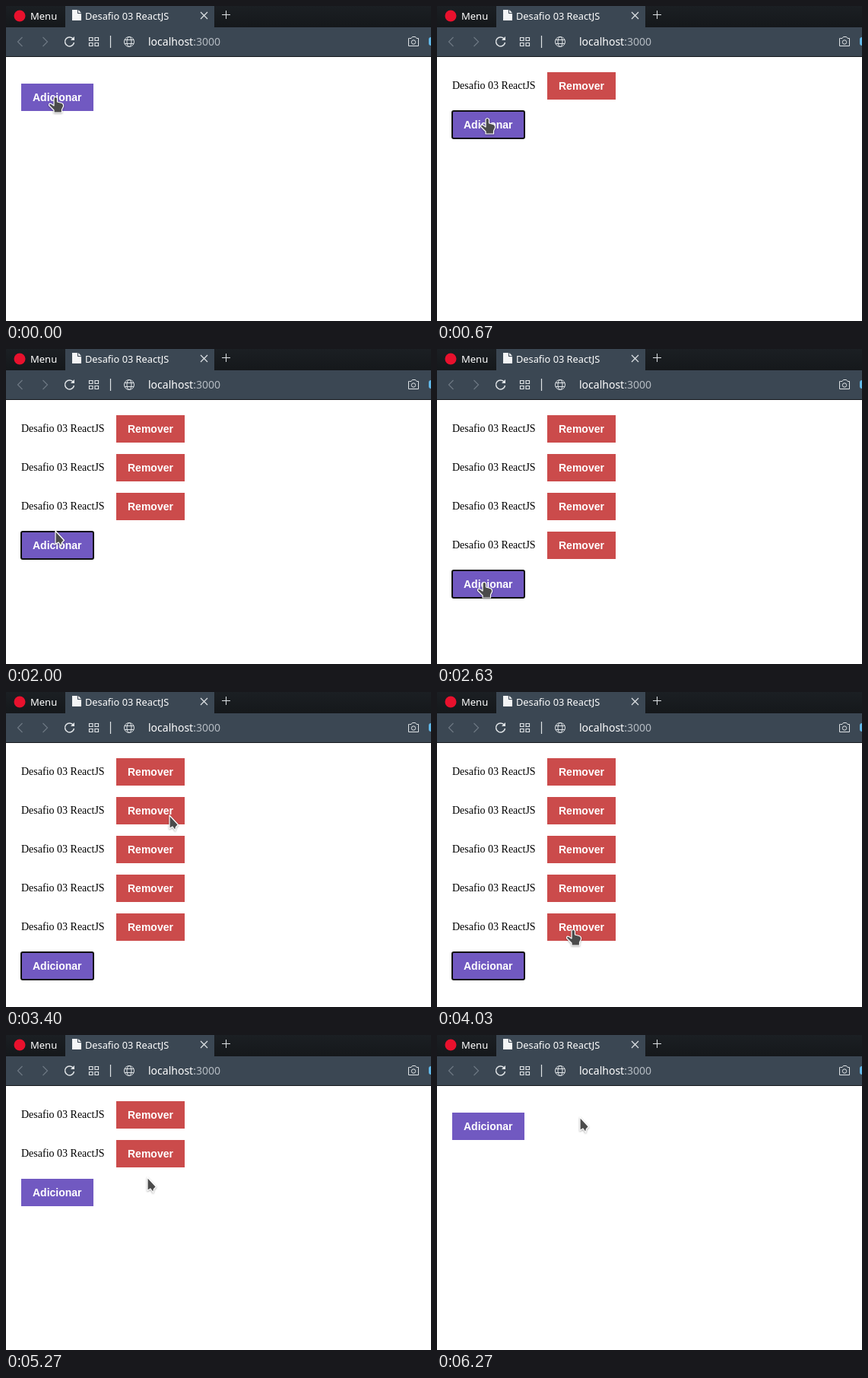
Recreate the animation shown at these times as an HTML page. Size 559 by 414 pixels, loop 6.66 s.

```html
<!DOCTYPE html>
<html lang="pt">
<head>
<meta charset="utf-8">
<title>Desafio 03 ReactJS</title>
<style>
  html, body { margin: 0; width: 100%; height: 100%; overflow: hidden; background: #fff; }
  svg { display: block; }
  .ui { font: 13px "Noto Sans", sans-serif; fill: #fff; }
  .ui .tab { font-size: 12.8px; }
  .ui .url { font-size: 14px; }
  .label { font: bold 14px "Liberation Sans", Arial, sans-serif; fill: #fff; }
  .item { font: 14px "Liberation Serif", "Times New Roman", serif; fill: #000; }
  .icons { fill: none; stroke: #dfe3e6; stroke-width: 1.2; }
  #focus { fill: none; stroke: #101010; stroke-width: 2; }
  #cursor { fill: #4b4b4b; stroke: #fff; stroke-width: 1.2; stroke-linejoin: round;
            filter: drop-shadow(0 1px 1px #0005); }
</style>
</head>
<body>
<svg width="559" height="414" viewBox="0 0 559 414">
  <defs>
    <linearGradient id="bar" x2="0" y2="1">
      <stop stop-color="#1b1f23"/><stop offset="1" stop-color="#15181b"/>
    </linearGradient>
  </defs>
  <rect width="559" height="28" fill="url(#bar)"/>
  <path d="M78 0H274V28H559V66H0V28H78Z" fill="#3b4753"/>
  <rect y="66" width="559" height="1" fill="#15191d"/>
  <circle cx="18" cy="13" r="7.5" fill="#e8112d"/>
  <g class="ui">
    <text x="32" y="18">Menu</text>
    <text class="tab" x="104" y="18">Desafio 03 ReactJS</text>
    <text class="url" x="187" y="52">localhost<tspan fill="#b3bac1">:3000</tspan></text>
  </g>
  <path d="M87 5H94V10H99V19H87ZM95 5L99 9H95Z" fill="#f4f5f6"/>
  <g class="icons">
    <path d="M256 8L265 17M265 8L256 17"/>
    <path d="M284 11.5H295M289.5 6V17" stroke-width="1"/>
    <path d="M21.5 41L15.5 47L21.5 53M48.5 41L54.5 47L48.5 53" stroke="#6d7883"/>
    <path d="M88.5 43.5A6 6 0 1 0 89.5 48" stroke-width="1.5"/>
    <path d="M90 40V45H85Z" fill="#e3e7ea" stroke="none"/>
    <path d="M109.5 41.5h4.5v4h-4.5zM117 41.5h4.5v4h-4.5zM109.5 48.5h4.5v4h-4.5zM117 48.5h4.5v4h-4.5z"/>
    <path d="M137.5 39V55"/>
    <g stroke-width="1">
      <circle cx="162" cy="47" r="6.5"/>
      <ellipse cx="162" cy="47" rx="3" ry="6.5"/>
      <path d="M156 44.5H168M156 49.5H168"/>
      <path d="M530.5 42.5H533L534.5 40.5H538.5L540 42.5H542.5V52.5H529.5V42.5Z"/>
      <circle cx="536" cy="47.5" r="2.7"/>
    </g>
  </g>
  <rect x="556" y="41" width="12" height="11" rx="3" fill="#62b8e8"/>
  <g id="rows"></g>
  <g id="add">
    <rect x="20" width="95" height="36" fill="#7159c1"/>
    <text class="label" x="35" y="23">Adicionar</text>
  </g>
  <rect id="focus" height="36" rx="2"/>
  <path id="cursor"/>
</svg>
<script>
const LOOP = 6660, STEP = 100 / 3, PRESS = 70, LAG = 30;
const ARROW = "M0 0V17.5L4 15L7.5 20L8.5 15.5L11.5 12.5Z";
const HAND = "M-1 1Q1-2 3.500 1V6L9 7.500Q12 8.500 11.500 12L9.500 16V20H-1V17L-7.500 10.500Q-7.500 7-4.500 8.500L-1 11Z";

const adds = [400, 1100, 1800, 2370, 3000];
const removes = [4240, 4700, 5130, 5940, 6240];

// Pointer strokes: start, end, x, y; the pointer rests in between
const home = [64, 120];
const strokes = [
  [430, 770, 65, 151], [1340, 1570, 66, 202], [1870, 2200, 64, 261], [2400, 2800, 60, 317],
  [3000, 3100, 66, 360], [3100, 3360, 224, 128], [3360, 3770, 178, 313],
  [4270, 4570, 188, 247], [4730, 5000, 186, 206], [5170, 5630, 187, 157], [5970, 6170, 188, 108]
];

const $ = id => document.getElementById(id);
const set = (node, attrs) => Object.entries(attrs).forEach(([k, v]) => node.setAttribute(k, v));
const show = on => on ? "visible" : "hidden";
const rowTop = i => 87 + 51 * i;
const addTop = n => n ? rowTop(n) : 102;
const countAt = t => adds.filter(a => t >= a).length - removes.filter(r => t >= r).length;
const easeOut = k => 1 - (1 - k) ** 2;

$("rows").innerHTML = adds.map((_, i) => `<g transform="translate(0 ${rowTop(i)})">
  <text class="item" x="20" y="22">Desafio 03 ReactJS</text>
  <rect x="145" width="90" height="36" fill="#cb4b4b"/>
  <text class="label" x="160" y="23">Remover</text></g>`).join("");
const rows = [...$("rows").children];

function pointerAt(t) {
  let [x, y] = home;
  for (const [start, end, toX, toY] of strokes) {
    const k = easeOut(Math.min(1, Math.max(0, (t - start) / (end - start))));
    x += (toX - x) * k;
    y += (toY - y) * k;
  }
  return [Math.round(x), Math.round(y)];
}

function overButton(t) {
  const [x, y] = pointerAt(t), n = countAt(t);
  const inside = (left, width, top) => x >= left && x < left + width && y >= top && y < top + 36;
  return inside(20, 95, addTop(n)) || rows.some((_, i) => i < n && inside(145, 90, rowTop(i)));
}

function draw(now) {
  const t = Math.round(Math.floor((now % LOOP + 4) / STEP) * STEP / 10) * 10;
  const n = countAt(t);
  rows.forEach((row, i) => set(row, { visibility: show(i < n) }));
  set($("add"), { transform: `translate(0 ${addTop(n)})` });

  const onAdd = t >= adds[0] - LAG && t < removes[0] - PRESS;
  const onRow = removes.some(r => t >= r - PRESS && t < r);
  set($("focus"), {
    visibility: show(onAdd || onRow),
    x: onAdd ? 20 : 145,
    width: onAdd ? 95 : 90,
    y: onAdd ? addTop(n) : rowTop(n - 1)
  });

  // The pointer shape reacts slightly late
  set($("cursor"), {
    d: overButton(Math.max(0, t - LAG)) ? HAND : ARROW,
    transform: `translate(${pointerAt(t)})`
  });
}

const start = performance.now();
function tick() {
  draw(performance.now() - start);
  requestAnimationFrame(tick);
}
tick();
</script>
</body>
</html>
```
